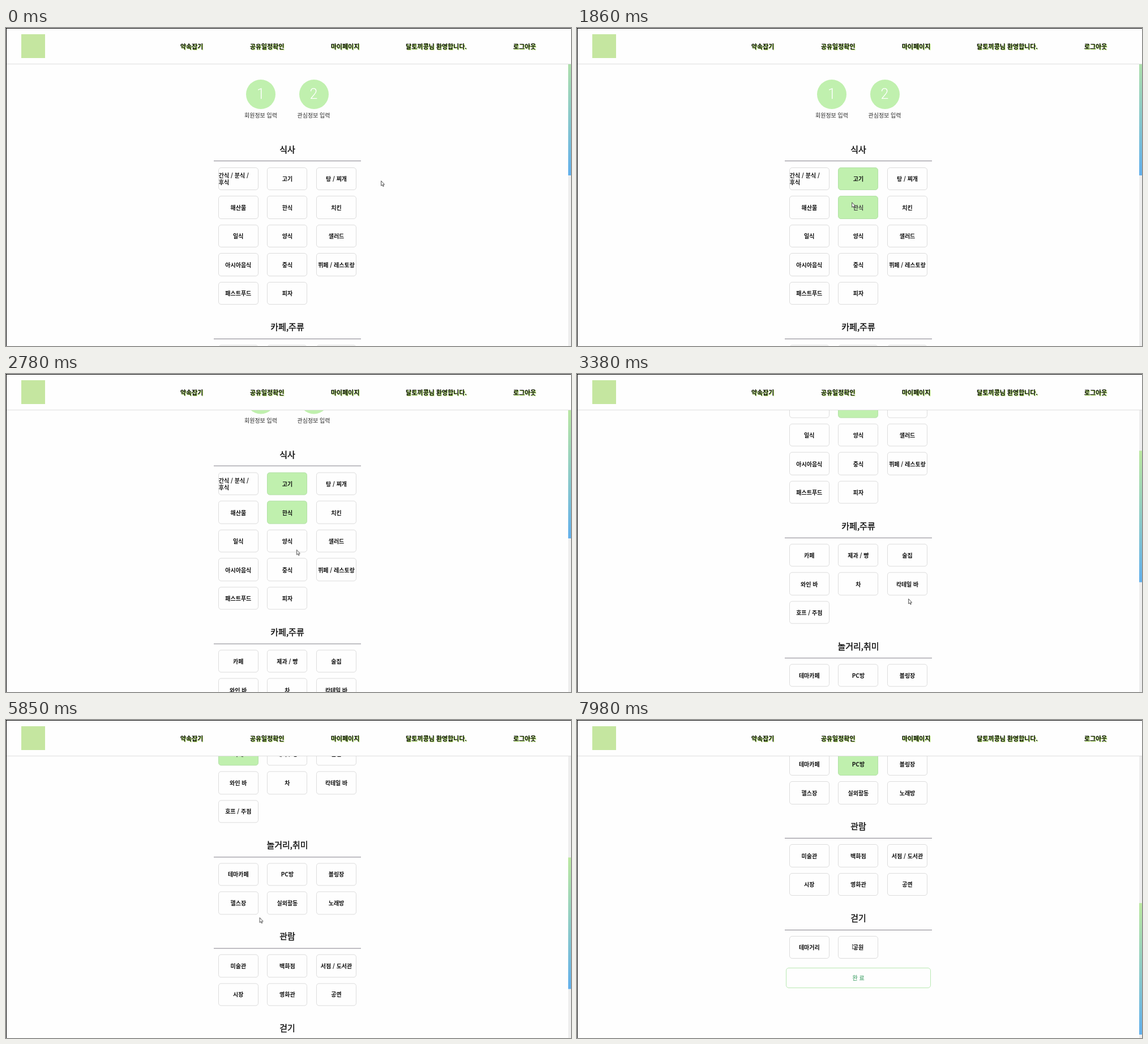
Animation, 998 px wide and 561 px high, one loop 8000 ms. Source, as an HTML page:

```html
<!DOCTYPE html>
<html lang="ko">
<head>
<meta charset="utf-8">
<title>관심정보 입력</title>
<style>
@property --scroll { syntax: '<number>'; inherits: true; initial-value: 0; }
html, body { margin: 0; width: 100%; height: 100%; overflow: hidden; background: #fefefe; }
#stage {
  position: relative; width: 998px; height: 561px; overflow: hidden;
  background: #fefefe; color: #111;
  font: 10px/12px 'Noto Sans CJK KR', 'Noto Sans CJK', 'Noto Sans', sans-serif;
  animation: scroll 8s linear infinite;
}
#stage * { position: absolute; box-sizing: border-box; }
#page { inset: 0; transform: translateY(calc(var(--scroll) * -1px)); }

.mid { transform: translate(-50%, -50%); white-space: nowrap; }
.step { width: 52px; height: 52px; border-radius: 50%; background: #c0f0ae; top: 91px; }
.digit { color: #fff; font: 300 25px/30px Roboto, 'Noto Sans', sans-serif; }
.label { color: #2a2a2a; }
.title { font-size: 15px; line-height: 20px; -webkit-text-stroke: .4px; left: 497px; }
.rule { left: 367px; width: 260px; height: 1px; background: #83808a; }
.box {
  display: flex; align-items: center; justify-content: center;
  width: 71px; height: 40.5px; border: 1px solid #dcdcdc; border-radius: 5px;
  background: #fefefe; font-weight: 600; word-break: keep-all;
}
.box span { position: static !important; }
#done {
  left: 369px; top: 1149.8px; width: 256px; height: 36px;
  border-color: #b8e8b2; color: #6fb78c;
}

#track { left: 993px; top: 63px; width: 5px; height: 498px; background: #eee; }
#thumb {
  left: 993px; top: 28px; width: 5px; height: 232px;
  background: linear-gradient(#bbe8a0, #62b0ec);
  transform: translateY(calc(var(--scroll) * .4137px));
}
#header { left: 0; top: 0; width: 998px; height: 64px; background: #fefefe; border-bottom: 1px solid #dedede; }
#logo { left: 27px; top: 11px; width: 42px; height: 42px; background: #c5e6a0; }
.nav { top: 32px; font-size: 11px; line-height: 16px; font-weight: 600; text-shadow: 1px 1px 1px #a4e04c; }
#frame { inset: 0; border: solid #000; border-width: 1px 0 0 1px; }
#cursor { left: 0; top: 0; width: 8px; height: 12px; animation: cursor 8s linear infinite; }

@keyframes scroll {
  0%, 24.1% { --scroll: 0; animation-timing-function: ease-in-out; }
  29% { --scroll: 195; animation-timing-function: ease-out; }
  30.6%, 31.5% { --scroll: 207.5; animation-timing-function: ease-in; }
  34.75% { --scroll: 72.7; animation-timing-function: ease-out; }
  36.5%, 37.2% { --scroll: 51.9; animation-timing-function: ease-in-out; }
  41.5%, 63.9% { --scroll: 259.4; animation-timing-function: ease-in-out; }
  73.1%, 85.6% { --scroll: 518.6; animation-timing-function: ease-in-out; }
  94.8%, 100% { --scroll: 713; }
}
@keyframes cursor {
  0%, .8% { transform: translate(662px, 269px); }
  2.5% { transform: translate(664px, 272px); }
  7% { transform: translate(560px, 284px); animation-timing-function: ease-out; }
  10.4%, 11.6% { transform: translate(500px, 276px); animation-timing-function: ease-in-out; }
  17.4%, 24.1% { transform: translate(485px, 307px); animation-timing-function: ease-in-out; }
  29% { transform: translate(525.5px, 306px); }
  34.75% { transform: translate(512.8px, 309.5px); animation-timing-function: ease-in-out; }
  41.5%, 42.2% { transform: translate(585px, 396px); animation-timing-function: ease-in-out; }
  51.4%, 53.1% { transform: translate(425px, 331px); }
  58%, 63.9% { transform: translate(431.5px, 334.5px); }
  73.1%, 74% { transform: translate(447.5px, 348px); animation-timing-function: ease-in-out; }
  83.9%, 85.6% { transform: translate(490px, 284px); }
  94.8% { transform: translate(485.5px, 310px); animation-timing-function: ease-in-out; }
  99.7%, 100% { transform: translate(486px, 395px); }
}
</style>
</head>
<body>
<div id="stage">
  <div id="page"></div>
  <div id="track"></div>
  <div id="thumb"></div>
  <div id="header"><div id="logo"></div></div>
  <div id="frame"></div>
  <svg id="cursor" viewBox="0 0 8 12">
    <path d="M.7 .7V9.3L2.6 7.6L4 10.6L5.3 10L4 7.1H6.5Z" fill="#fff" stroke="#3a3a3a" stroke-width=".9"/>
  </svg>
</div>
<script>
const DURATION = 8000;
const GREEN = '#c0f0ae';
const page = document.getElementById('page');
const header = document.getElementById('header');
const boxes = {};

function add(parent, className, text, x, y) {
  const el = document.createElement('div');
  el.className = className;
  if (x !== undefined) el.style.left = x + 'px';
  if (y !== undefined) el.style.top = y + 'px';
  const span = document.createElement('span');
  span.textContent = text;
  if (className === 'box') el.append(span);
  else el.textContent = text;
  parent.append(el);
  return el;
}

const menu = [['약속잡기', 328], ['공유일정확인', 461], ['마이페이지', 599],
  ['달토끼콩님 환영합니다.', 760], ['로그아웃', 916]];
for (const [text, x] of menu) add(header, 'nav mid', text, x);

[['회원정보 입력', 450], ['관심정보 입력', 543.5]].forEach(([text, x], i) => {
  add(page, 'step', '', x - 26);
  add(page, 'digit mid', i + 1, x, 117);
  add(page, 'label mid', text, x, 153.5);
});

const sections = {
  '식사': ['간식 / 분식 / 후식', '고기', '탕 / 찌개', '해산물', '한식', '치킨', '일식', '양식', '샐러드',
    '아시아음식', '중식', '뷔페 / 레스토랑', '패스트푸드', '피자'],
  '카페,주류': ['카페', '제과 / 빵', '술집', '와인 바', '차', '칵테일 바', '호프 / 주점'],
  '놀거리,취미': ['테마카페', 'PC방', '볼링장', '헬스장', '실외활동', '노래방'],
  '관람': ['미술관', '백화점', '서점 / 도서관', '시장', '영화관', '공연'],
  '걷기': ['테마거리', '공원'],
};
const ROW = 50.55;
let y = 213.6;
for (const [title, items] of Object.entries(sections)) {
  add(page, 'title mid', title, undefined, y);
  add(page, 'rule', '', undefined, y + 20.8);
  items.forEach((text, i) => {
    boxes[text] = add(page, 'box', text, 374.8 + (i % 3) * 86.6, y + 32.1 + Math.floor(i / 3) * ROW);
  });
  y += 60.4 + Math.ceil(items.length / 3) * ROW;
}
add(page, 'box', '완 료').id = 'done';

function loop(el, frames) {
  el.animate(frames.map(([time, style]) => ({ offset: Math.min(time / DURATION, 1), ...style })),
    { duration: DURATION, iterations: Infinity });
}

function select(name, time) {
  const off = { backgroundColor: '#fefefe', borderColor: '#dcdcdc' };
  const on = { backgroundColor: GREEN, borderColor: '#b2e0a6' };
  loop(boxes[name], [[0, off], [time, off], [time + 80, on], [DURATION, on]]);
}

function hover(name, start, end) {
  const rest = { color: '#111' }, dim = { color: '#444' };
  loop(boxes[name], [[0, rest], [start, rest], [start + 150, dim],
    [end, dim], [end + 150, rest], [DURATION, rest]]);
}

select('고기', 780);
select('한식', 1670);
select('카페', 4740);
select('PC방', 6770);
hover('고기', 680, 1150);
hover('한식', 1270, 2000);
hover('카페', 3960, 5300);
hover('PC방', 6690, 7050);
</script>
</body>
</html>
```
